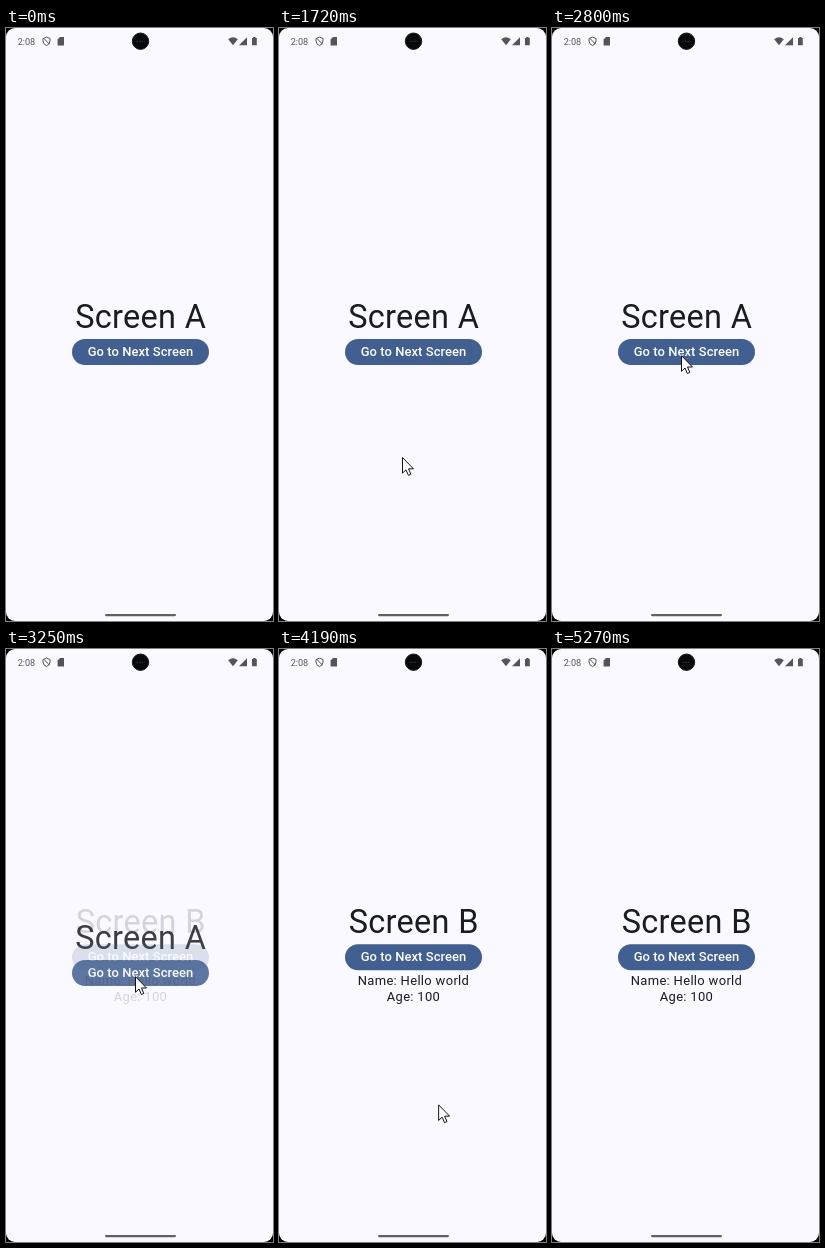
Animation, 267 px wide and 593 px high, one loop 7.38 s. Source, as an HTML page:

```html
<!DOCTYPE html>
<html lang="en">
<head>
<meta charset="utf-8">
<title>Screen navigation</title>
<style>
  html, body { margin: 0; width: 100%; height: 100%; overflow: hidden; background: #000; }
  svg { display: block; width: 267px; height: 593px; font-family: Roboto, sans-serif; }
  .screen { text-anchor: middle; fill: #191c20; font-size: 12.98px; letter-spacing: .325px; }
  .title { font-size: 32.45px; }
  .label { fill: #fff; font-weight: 500; letter-spacing: .065px; }
  .button { fill: #415f91; }
  .icon { fill: #54545a; }
</style>
</head>
<body>
<svg viewBox="0 0 267 593">
  <rect width="267" height="593" rx="9" fill="#faf9ff"/>

  <g class="icon">
    <text x="11.7" y="16.8" font-size="9.1">2:08</text>
    <path d="M40.5 9.2L44 10.5V13Q44 16.2 40.5 17.6Q37 16.2 37 13V10.5ZM38 10.5L43.5 16.2" fill="none" stroke="#54545a"/>
    <path d="M54 9H58V17.5H51.6V11.4Z"/>
    <path d="M222.2 11.3Q227 7.3 231.8 11.3L227 17.3Z"/>
    <path d="M233 17.2L241 9.2V17.2Z"/>
    <path d="M246 10H247.2V9H249.6V10H250.8V17.3H246Z"/>
  </g>
  <circle cx="134.5" cy="13.2" r="8.2" fill="#08090a" stroke="#17191b"/>
  <path d="M130.5 13.3H138.5" stroke="#33373a" stroke-dasharray="1.5 1"/>

  <defs>
    <g id="button">
      <rect class="button" x="66" width="137" height="26" rx="13"/>
      <text class="label" x="134.5" y="17.3">Go to Next Screen</text>
    </g>
  </defs>
  <g id="a" class="screen">
    <text class="title" x="134.7" y="300.2">Screen A</text>
    <use href="#button" y="311"/>
  </g>
  <g id="b" class="screen">
    <text class="title" x="134.7" y="284.4">Screen B</text>
    <use href="#button" y="295.2"/>
    <text x="134.5" y="336.2">Name: Hello world</text>
    <text x="134.5" y="352">Age: 100</text>
  </g>

  <rect x="99" y="586" width="71" height="2.2" rx="1.1" fill="#606064"/>
  <path id="cursor" fill="#fff" stroke="#111" stroke-linejoin="round"
    d="M.5 .7V16.3L4 13L6.4 18.5L8.8 17.4L6.5 12H11.5Z"/>
</svg>
<script>
const LOOP = 7380, FADE_START = 3100, FADE_TIME = 700;
const [a, b, cursor] = ["a", "b", "cursor"].map(id => document.getElementById(id));

// Pointer moves: start, end, x, y, ease-out power
const moves = [
  [650, 1140, 124, 529, 1.3],
  [1430, 1720, 123, 429],
  [1720, 2170, 128, 353],
  [2190, 2800, 129, 327, 3],
  [3700, 4190, 159, 455],
  [4190, 4550, 215, 516],
  [4600, 5270, 237, 593]
];

const progress = (t, start, end) => Math.min(1, Math.max(0, (t - start) / (end - start)));

// cubic-bezier(.4, 0, .2, 1), solved by bisection
function ease(x) {
  let u = .5;
  for (let step = .25; step > 1e-5; step /= 2) {
    const v = 1 - u;
    u += 1.2 * u * v * v + .6 * u * u * v + u ** 3 < x ? step : -step;
  }
  return u * u * (3 - 2 * u);
}

function pointer(t) {
  let x = 112, y = 593;
  for (const [start, end, toX, toY, power = 1] of moves) {
    const k = 1 - (1 - progress(t, start, end)) ** power;
    x += (toX - x) * k;
    y += (toY - y) * k;
  }
  return `translate(${x} ${y})`;
}

const begin = performance.now();
function draw() {
  const t = (performance.now() - begin) % LOOP;
  const fade = ease(progress(t, FADE_START, FADE_START + FADE_TIME));
  a.setAttribute("opacity", 1 - fade);
  b.setAttribute("opacity", fade);
  cursor.setAttribute("transform", pointer(t));
  requestAnimationFrame(draw);
}
draw();
</script>
</body>
</html>
```
